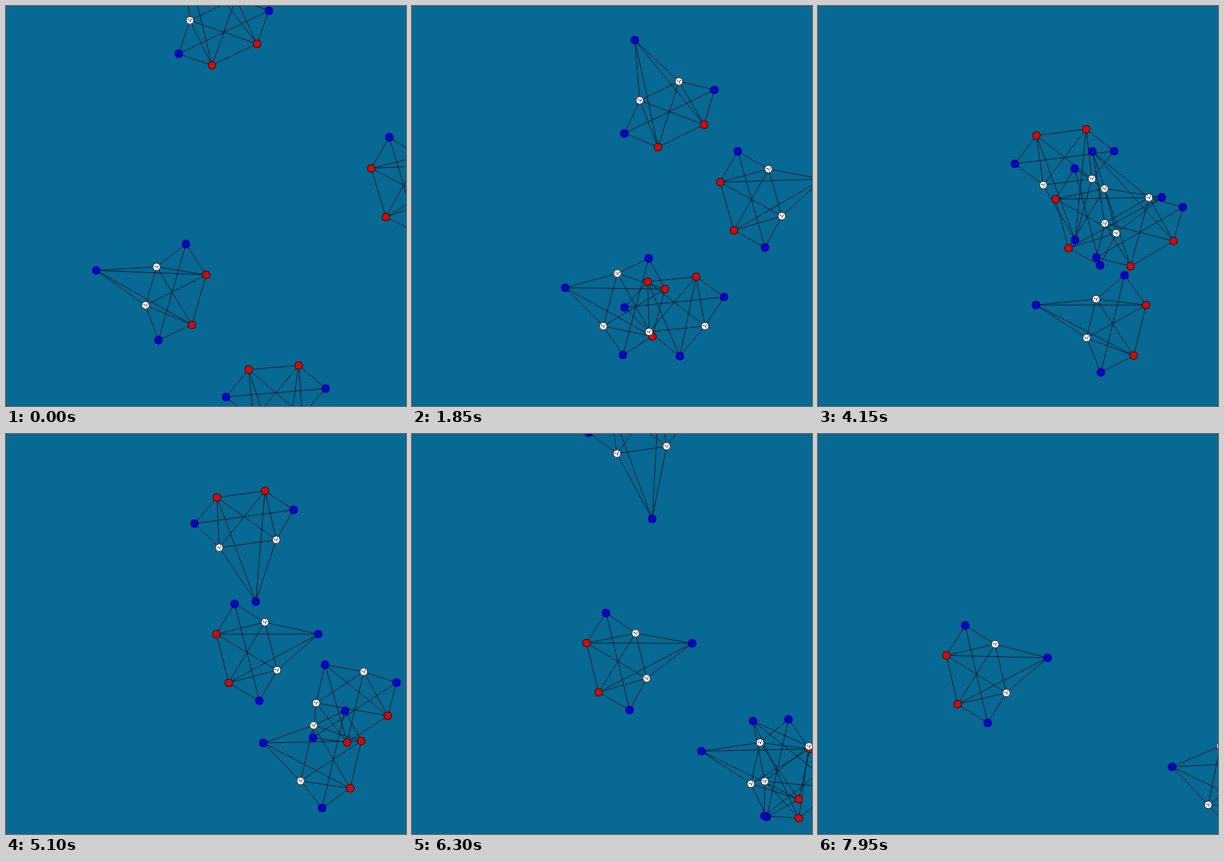
Write an HTML page with a canvas that moves like this. It is 400x400 px and loops after 8 s.

```html
<!DOCTYPE html>
<html lang="en">
<head>
<meta charset="utf-8">
<title>Drifting molecules</title>
<style>
  html, body { margin: 0; width: 100%; height: 100%; overflow: hidden; background: #086994; }
  canvas { display: block; width: 100vw; height: 100vh; }
</style>
</head>
<body>
<canvas id="stage" width="400" height="400"></canvas>
<script>
const ctx = document.getElementById('stage').getContext('2d');
const LOOP = 8000, STEP = 50;
const DEG = Math.PI / 180;
const VIBRATION_HZ = 1.446;

// Seconds and pixels. Polynomials in time: [start, speed, half acceleration].
// Vibrations: [mean, amplitude, phase in degrees].
const molecules = [
  { x: [157, 29.7, 0.3], y: [283.5, 7.7, 0], angle: [106, -0.55, 0],
    reach: [75, 4, 0], waist: [25, 5, 180] },
  { x: [212, 20, 1.15], y: [14, 41.5, 1.65], angle: [154.5, 0.6, -0.42],
    reach: [76, 22, 36], waist: [25.5, 4.2, -90] },
  { x: [407.5, -31.8, 0.22], y: [176.2, 7.75, 0], angle: [-106.7, 0.47, 0],
    reach: [75, 2, 0], waist: [24, 1, 180] },
  { x: [270.8, -3, -0.6], y: [398.4, -45.5, -2.7], angle: [-4.8, -0.6, 0],
    reach: [76, 22, -71], waist: [27, 2.5, 180] }
];

// Atoms: 0 tip, 1-2 waist, 3-4 wings, 5-6 base
const KINDS = ['blue', 'white', 'white', 'blue', 'blue', 'red', 'red'];
const COLORS = { blue: '#0404cc', white: '#f6f6f6', red: '#d80808' };
const BONDS = ['01', '02', '05', '06', '12', '13', '24', '15', '16', '25', '26', '34', '35', '46', '56'];

const glide = ([start, speed, bend], t) => start + speed * t + bend * t * t;
const vibrate = ([mean, amplitude, phase], t) =>
  mean + amplitude * Math.cos(2 * Math.PI * VIBRATION_HZ * t + phase * DEG);

function atomsOf(molecule, t) {
  const x = glide(molecule.x, t), y = glide(molecule.y, t);
  const angle = glide(molecule.angle, t) * DEG;
  const c = Math.cos(angle), s = Math.sin(angle);
  const reach = vibrate(molecule.reach, t), waist = vibrate(molecule.waist, t);
  const shift = 0.6 * (waist - 20);
  const waistAlong = 22 + shift, baseAlong = -28 + shift;
  // Measuring from the centre of mass makes the body recoil against the tip
  const mass = (reach + 2 * waistAlong + 2 * baseAlong) / 7;
  const place = (along, across) => [
    x - s * (along - mass) + c * across,
    y + c * (along - mass) + s * across
  ];
  const pair = (along, half) => [place(along, -half), place(along, half)];
  return [
    place(reach, 0),
    ...pair(waistAlong, waist),
    ...pair(0, 50),
    ...pair(baseAlong, 26 - shift / 3)
  ];
}

function drawAtom([x, y], kind) {
  ctx.beginPath();
  ctx.arc(x, y, 3.9, 0, 2 * Math.PI);
  ctx.fillStyle = COLORS[kind];
  ctx.fill();
  ctx.lineWidth = 0.8;
  ctx.strokeStyle = kind === 'blue' ? '#000070' : '#181818';
  ctx.stroke();
  if (kind === 'white') {
    ctx.fillStyle = '#555';
    ctx.fillRect(x - 2, y - 1, 1.5, 1);
    ctx.fillRect(x, y - 0.5, 1, 2);
    ctx.fillRect(x + 1, y - 1.5, 1, 1);
  }
}

function draw(t) {
  ctx.fillStyle = '#086994';
  ctx.fillRect(0, 0, 400, 400);
  const shapes = molecules.map(molecule => atomsOf(molecule, t));
  ctx.beginPath();
  for (const atoms of shapes) {
    for (const [a, b] of BONDS) {
      ctx.moveTo(...atoms[a]);
      ctx.lineTo(...atoms[b]);
    }
  }
  ctx.lineWidth = 0.9;
  ctx.strokeStyle = 'rgba(0, 10, 20, 0.64)';
  ctx.stroke();
  for (const atoms of shapes) atoms.forEach((p, i) => drawAtom(p, KINDS[i]));
}

const start = performance.now();
function tick() {
  const elapsed = (performance.now() - start) % LOOP;
  draw(Math.floor(elapsed / STEP) * STEP / 1000);
  requestAnimationFrame(tick);
}
tick();
</script>
</body>
</html>
```
